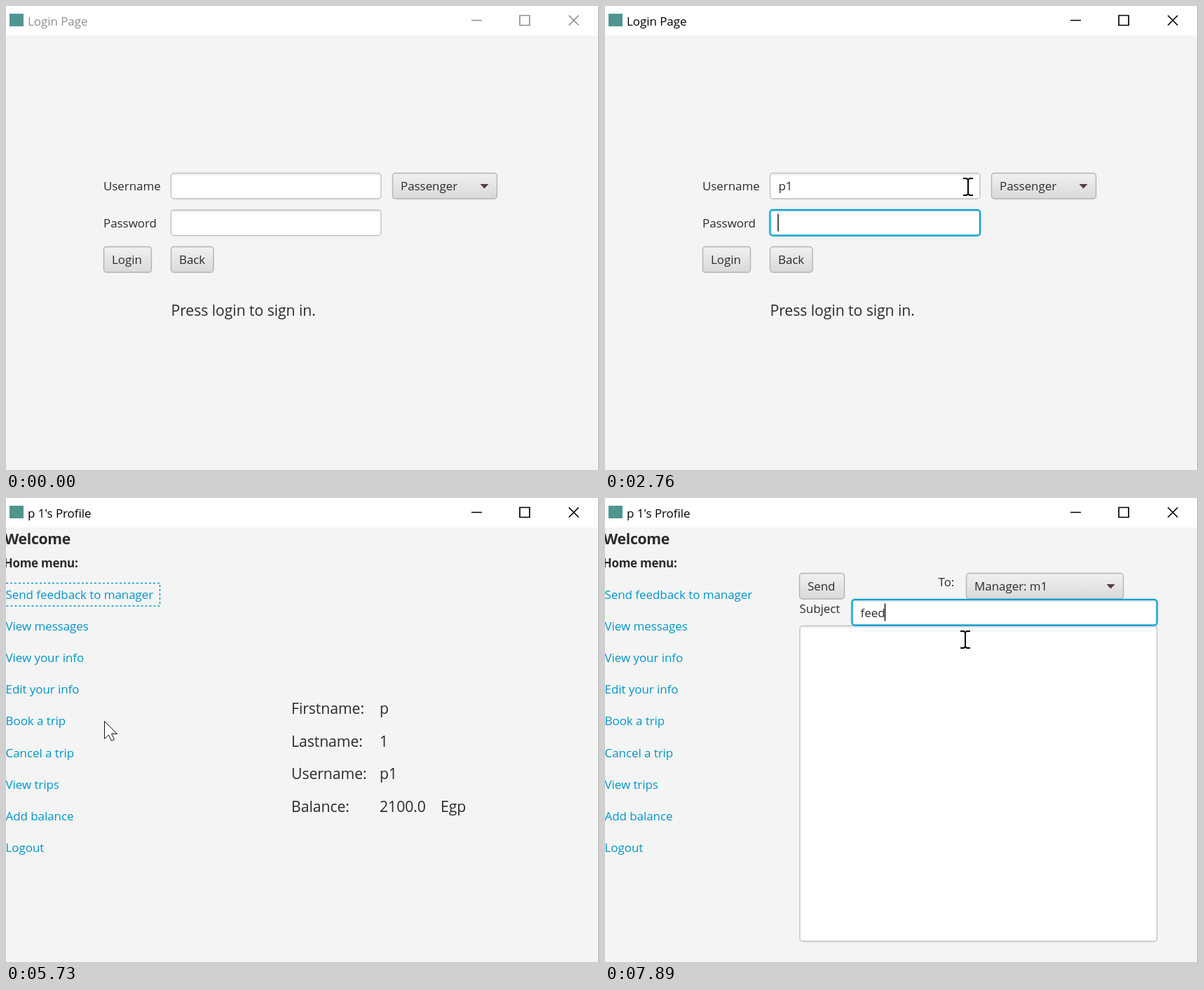
An HTML page for the animation above (8 s loop, 846 by 662 pixels).

```html
<!DOCTYPE html>
<html lang="en">
<head>
<meta charset="utf-8">
<title>Login walkthrough</title>
<style>
  html, body { margin: 0; width: 100%; height: 100%; overflow: hidden; background: #f4f4f4; }
  svg { display: block; width: 100%; height: 100%; }
  text { font: 17px "Open Sans", "Noto Sans", sans-serif; letter-spacing: -.004em; fill: #2b2b2b; white-space: pre; }
  .big { font-size: 21.25px; }
  .bold { font-weight: 700; text-anchor: end; letter-spacing: -.0165em; }
  .bar text { fill: currentColor; }
  .bar path { fill: none; stroke: currentColor; stroke-width: 1.7; }
  .link { fill: #0096c9; }
  .link.hover { text-decoration: underline; }
  .link.pressed { fill: #2b2b2b; }
  .field { fill: #fff; stroke: #bcbcbc; stroke-width: 1.3; }
  .shade { stroke: #ececec; stroke-width: 2; }
  .button { fill: url(#face); stroke: #b3b3b3; stroke-width: 1.4; }
  .focus { fill: none; stroke: #039ed3; stroke-width: 2; }
  .glow { fill: none; stroke: #039ed3; stroke-opacity: .14; stroke-width: 5; }
  .caret { stroke: #111; stroke-width: 1.5; }
  .dashes { fill: none; stroke: #0096c9; stroke-width: 1.5; stroke-dasharray: 3 3; }
  .pointer { fill: #fff; stroke: #111; stroke-width: 1; stroke-linejoin: round; }
  #click { fill: #fff766; mix-blend-mode: multiply; }
</style>
</head>
<body>
<svg id="stage" viewBox="0 0 846 662">
  <defs>
    <linearGradient id="face" x2="0" y2="1">
      <stop stop-color="#f1f1f1"/><stop offset="1" stop-color="#d9d9d9"/>
    </linearGradient>
  </defs>
  <rect width="846" height="662" fill="#f4f4f4"/>
  <g id="pages"></g>
  <rect width="846" height="42" fill="#fff"/>
  <path d="M845.5 0V662" stroke="#a8a8a8"/>
  <rect x="5" y="11" width="20" height="18" fill="#4f9590"/>
  <g id="bar" class="bar"></g>
  <g id="arrow" class="pointer"><path d="M.5 .5V25.500l6-5.500 4 8.500 4-2-4-8h8z"/></g>
  <g id="hand" class="pointer">
    <path d="M-3 2q3-4 6 0v11q3-3 4 1q3-2 4 1q3-1 4 3v7q0 10-10 10q-5 0-8-6l-7-8q3-4 7 1z"/>
    <path d="M3 13v5M7 14v4M11 15v4" fill="none"/>
  </g>
  <g id="beam" fill="none">
    <path d="M-7-8h5l2 2 2-2h5M0-6V14M-7 16h5l2-2 2 2h5" stroke="#fff" stroke-width="4"/>
    <path d="M-7-8h5l2 2 2-2h5M0-6V14M-7 16h5l2-2 2 2h5" stroke="#000" stroke-width="2"/>
  </g>
  <circle id="click" r="18"/>
</svg>
<script>
const LOOP = 8000, STEP = 76;
const $ = id => document.getElementById(id);

// "on" lists the visible span as a start/end pair in ms
const during = (on, body) => `<g data-on="${on}">${body}</g>`;
const label = (x, y, s, cls = '') => `<text x="${x}" y="${y}" class="${cls}">${s}</text>`;
const box = (x, y, w, h, cls) => `<rect x="${x}" y="${y}" width="${w}" height="${h}" rx="4" class="${cls}"/>`;
const field = (x, y, w, h) => box(x, y, w, h, 'field') + `<path class="shade" d="M${x + 3} ${y + 2}h${w - 6}"/>`;
const button = (x, y, w, s) => box(x, y, w, 36.5, 'button') + label(x + 11.5, y + 24.5, s);
const combo = (x, y, w, s) => button(x, y, w, s) + `<path d="M${x + w - 24} ${y + 15.5}h12l-6 6.500z" fill="#533a43"/>`;
const focus = (on, x, y, w) => during(on, box(x, y, w, 36.5, 'glow') + box(x, y, w, 36.5, 'focus'));
const caret = (on, x, y) => during(on, `<path class="caret" d="M${x} ${y}v25"/>`);
const dot = (n, from) => during([from, 5040], `<circle cx="${252.5 + 11 * n}" cy="310.500" r="4.300" fill="#2b2b2b"/>`);

const login = during('0 5040',
  label(139, 263, 'Username') + label(139, 316, 'Password') +
  field(235.5, 238.5, 299.5, 36.5) + field(235.5, 291, 299.5, 36.5) +
  combo(551.5, 238.5, 149, 'Passenger') +
  button(139.5, 343.5, 68, 'Login') + button(235.5, 343.5, 60.5, 'Back') +
  label(235.5, 442, 'Press login to sign in.', 'big') +
  focus('910 2150', 235.5, 238.5, 299.5) +
  focus('2150 2760', 551.5, 238.5, 149) +
  focus('2760 5040', 235.5, 291, 299.5) +
  during('1750 1830', label(247.5, 263, 'p')) + during('1830 5040', label(247.5, 263, 'p1')) +
  caret('1060 1520', 247, 244) + caret('1750 1830', 258, 244) + caret('1830 2150', 267.5, 244) +
  dot(0, 3395) + dot(1, 3470) + dot(2, 3620) +
  caret('2760 3320', 247, 296.5) + caret('3395 3470', 258.5, 296.5) +
  caret('3470 3620', 269.5, 296.5) + caret('3620 4080', 280, 296.5));

const links = ['Send feedback to manager', 'View messages', 'View your info', 'Edit your info',
  'Book a trip', 'Cancel a trip', 'View trips', 'Add balance', 'Logout'];
const menu = during('5040 8000',
  label(92, 66, 'Welcome', 'big bold') + label(102.5, 99, 'Home menu:', 'bold') +
  links.map((s, i) => label(-.5, 144 + 45.1 * i, s, 'link')).join('') +
  during('5040 6890', '<path class="dashes" d="M0 121.500H219.500V154H0"/>'));

const info = [['Firstname:', 'p'], ['Lastname:', '1'], ['Username:', 'p1'], ['Balance:', '2100.0']];
const profile = during('5040 6340',
  info.map(([name, value], i) => label(407, 308 + 46.7 * i, name, 'big') +
    label(533, 308 + 46.7 * i, value, 'big')).join('') + label(620, 448, 'Egp', 'big'));

const typed = [7120, 7430, 7580, 7740, 7890, LOOP];
const caretX = [365, 370.5, 380, 389.5, 399.5];
const form = during('6340 8000',
  button(277.5, 107.5, 64, 'Send') + label(475.5, 126, 'To:') +
  combo(515.5, 107.5, 224, 'Manager: m1') + label(277.5, 164, 'Subject') +
  field(278, 182.5, 509.5, 450) + field(352.5, 145, 435, 36.5) +
  focus('6890 8000', 352.5, 145, 435) +
  caretX.map((x, i) => {
    const on = [typed[i], typed[i + 1]];
    return during(on, label(364.5, 170, 'feed'.slice(0, i))) + caret(on, x, 150.5);
  }).join(''));

$('pages').innerHTML = login + menu + profile + form;
$('bar').innerHTML = during('0 5040', label(31, 28, 'Login Page')) +
  during('5040 8000', label(31, 28, "p 1's Profile")) +
  '<path d="M664 20.500h15M733 13.500h14v14h-14zM803 13.500l14 14m0-14l-14 14"/>';

// pointer hotspot: time, x, y
const path = [
  [70, 638, 524], [220, 612, 440], [380, 585, 370], [530, 550, 300], [680, 522, 264], [830, 518, 254],
  [4080, 518, 254], [4160, 525, 300], [4250, 527, 369], [4330, 527, 369],
  [4480, 519, 388], [4560, 350, 340], [4635, 130, 290], [4710, 22, 300], [4790, 120, 345], [4870, 184, 355],
  [5040, 184, 355], [5190, 205, 385], [5420, 130, 455], [5570, 120, 430], [5800, 150, 260],
  [5950, 172, 170], [6110, 176, 140], [6340, 176, 140], [6500, 330, 170], [6660, 490, 213],
  [6740, 503, 203], [6890, 505, 159], [7120, 505, 159], [7200, 510, 182], [7280, 514, 198], [LOOP, 514, 198]
];
const within = (t, spans) => spans.some(([a, b]) => t >= a && t < b);
const inside = (p, x, y, w, h) => p.x >= x && p.x <= x + w && p.y >= y && p.y <= y + h;

function pointerAt(t) {
  const i = Math.max(1, path.findIndex(k => k[0] > t));
  const [t0, x0, y0] = path[i - 1], [t1, x1, y1] = path[i];
  const f = Math.floor(Math.max(0, t - t0) / STEP) * STEP / (t1 - t0);
  return { x: x0 + (x1 - x0) * f, y: y0 + (y1 - y0) * f };
}

const timed = [...document.querySelectorAll('[data-on]')].map(el => {
  const [from, to] = el.dataset.on.split(/[ ,]/).map(Number);
  return { el, from, to };
});
const firstLink = document.querySelector('.link');
const show = (el, on) => { el.style.display = on ? '' : 'none'; };

function draw(t) {
  timed.forEach(({ el, from, to }) => show(el, t >= from && t < to));
  $('bar').style.color = t < 910 ? '#8f8f8f' : '#000';

  const p = pointerAt(t);
  const visible = !within(t, [[0, 70], [4330, 4480]]);
  const overLink = t >= 5040 && inside(p, 0, 121, 219, 33);
  const overText = t < 5040
    ? inside(p, 235, 238, 301, 37) || inside(p, 235, 291, 301, 37)
    : t >= 6340 && (inside(p, 352, 144, 436, 38) || inside(p, 277, 182, 511, 451));
  const shape = overLink ? 'hand' : overText ? 'beam' : 'arrow';
  for (const id of ['arrow', 'hand', 'beam', 'click']) {
    $(id).setAttribute('transform', `translate(${Math.round(p.x)} ${Math.round(p.y)})`);
    show($(id), visible && id === shape);
  }
  show($('click'), within(t, [[910, 1060], [4870, 5040], [6190, 6340], [6890, 7120]]));
  firstLink.classList.toggle('hover', overLink);
  firstLink.classList.toggle('pressed', within(t, [[6190, 6340]]));
}

const start = performance.now();
function tick() {
  draw((performance.now() - start) % LOOP);
  requestAnimationFrame(tick);
}
tick();
</script>
</body>
</html>
```
